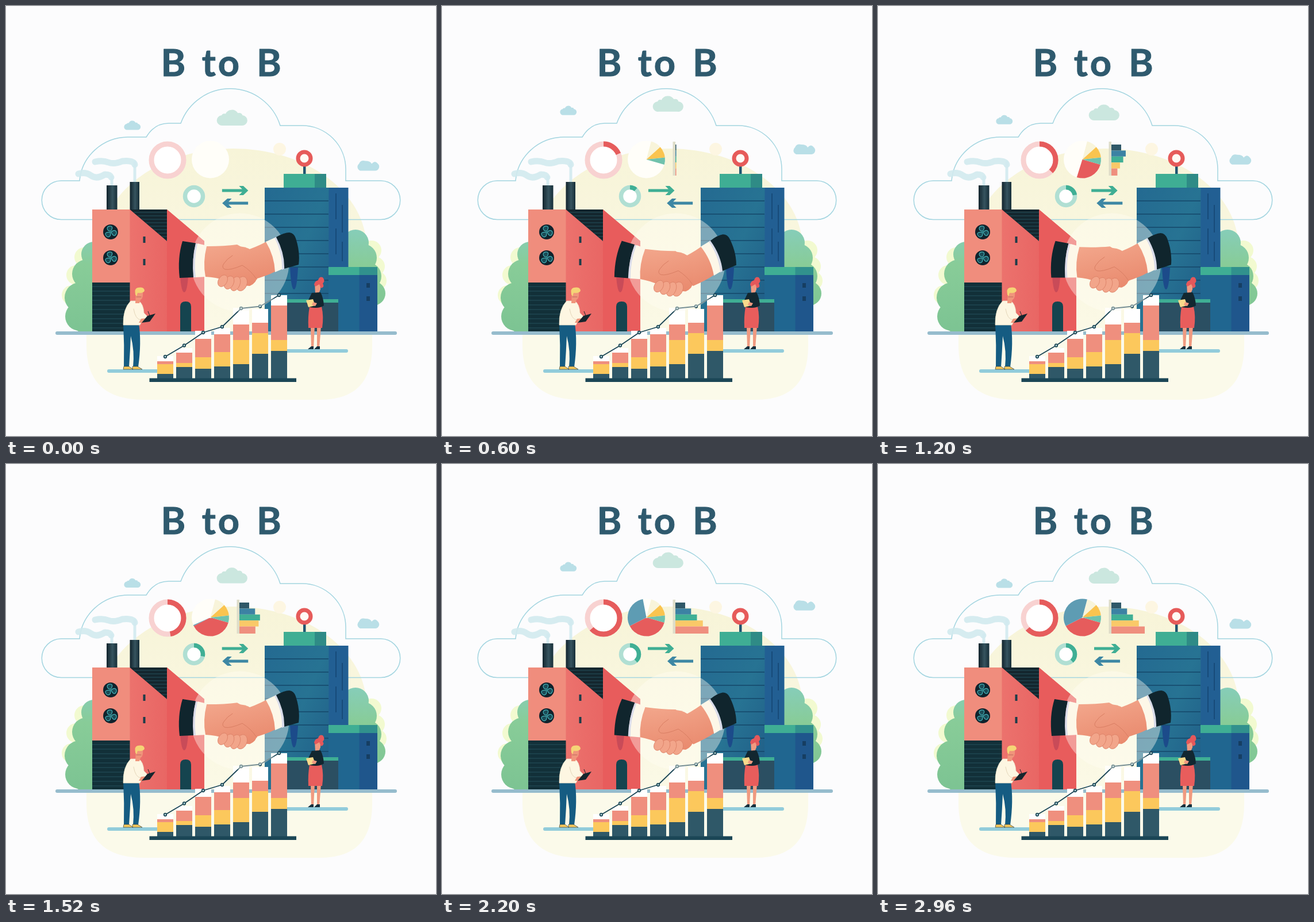
An HTML page for the animation above (3 s loop, 748 by 748 pixels).

```html
<!DOCTYPE html>
<html lang="en">
<head>
<meta charset="utf-8">
<title>B to B</title>
<style>
html, body { margin: 0; width: 100%; height: 100%; overflow: hidden; background: #fcfcfd; }
svg { display: block; width: 100vw; height: 100vh; }
text { font: 700 65px Lato, "Open Sans", sans-serif; fill: #2f5a6e; stroke: #2f5a6e; stroke-linejoin: round; text-anchor: middle; }
.line { fill: none; stroke-linecap: round; stroke-linejoin: round; }
</style>
</head>
<body>
<svg viewBox="0 0 748 748">
<defs>
  <linearGradient id="glow" x2="0" y2="1"><stop stop-color="#f7f4d8"/><stop offset="1" stop-color="#fbf9e6"/></linearGradient>
  <linearGradient id="wall"><stop stop-color="#ec726d"/><stop offset="1" stop-color="#e55a5b"/></linearGradient>
  <linearGradient id="glass" x2="1" y2="1"><stop stop-color="#246a91"/><stop offset=".5" stop-color="#277393"/><stop offset="1" stop-color="#1f5b86"/></linearGradient>
  <linearGradient id="pipe"><stop stop-color="#12242d"/><stop offset=".55" stop-color="#36545f"/><stop offset="1" stop-color="#172e38"/></linearGradient>
  <linearGradient id="skin" gradientUnits="userSpaceOnUse" x1="385" y1="412" x2="405" y2="492"><stop stop-color="#f2a58a"/><stop offset="1" stop-color="#e98a6e"/></linearGradient>
  <linearGradient id="leaf" gradientUnits="userSpaceOnUse" x1="0" y1="390" x2="0" y2="560"><stop stop-color="#86cdb8"/><stop offset=".35" stop-color="#88cc98"/><stop offset="1" stop-color="#7dc493"/></linearGradient>
  <path id="puff" d="M8 14A7 7 0 0 1 7 0Q8 -3 12 -2A9 9 0 0 1 28 -3Q33 -4 34 0A7 7 0 0 1 33 14Z"/>
  <path id="blade" fill="#1b4c57" stroke="#44b4ba" stroke-width="1.200" d="M0 -1C-9 -3 -7 -11 1 -10Q5 -8 0 -1Z"/>
  <g id="fan"><circle r="13" fill="#10232d"/><use href="#blade"/><use href="#blade" transform="rotate(120)"/><use href="#blade" transform="rotate(240)"/></g>
</defs>

<text x="291" y="122">B</text>
<text x="375.500" y="122" letter-spacing="4">to</text>
<text x="457.500" y="122">B</text>

<path fill="#fbfaea" d="M140 560H637V590C637 640 620 685 545 685H240C160 685 140 640 140 590Z"/>
<path fill="url(#glow)" d="M163 420A232 172 0 0 1 627 420V566H163Z"/>
<circle cx="476" cy="249" r="11" fill="#fdf6e2"/>
<path fill="none" stroke="#a3d5e0" stroke-width="1.500" d="M96 371.500A33.500 33.500 0 0 1 96 304H128A85 83 0 0 1 212 228H244Q258 204 283 204H304A91.300 91.300 0 0 1 477 208H515A76 76 0 0 1 591 284V304H652A33.500 33.500 0 0 1 652 371.500Z"/>

<g id="clouds">
  <use href="#puff" fill="#b9dfe7" transform="translate(205 205.500) scale(.72 .75)"/>
  <use href="#puff" fill="#cbe7df" transform="translate(366 190.500) scale(1.330 1.280)"/>
  <path fill="#b9dfe7" d="M616 287A7 7 0 0 1 614 275Q617 268 625 270Q634 270 636 275Q642 268 647 275A7 7 0 0 1 643 287Z"/>
</g>

<g class="line" stroke="#d2eaef" stroke-opacity=".9">
  <path stroke-width="11" d="M155 271Q168 268 178 272T202 270Q222 268 224 276"/>
  <path stroke-width="5" d="M224 272V306"/>
  <path stroke-width="11" d="M126 292Q138 288 148 295T172 293Q181 293 183 298"/>
  <path stroke-width="5" d="M184 297V312"/>
</g>

<g id="bushes"></g>
<path fill="url(#leaf)" d="M126 566Q108 555 108 535L140 440H152V566ZM594 400H625L645 500V540H594Z"/>

<path fill="url(#pipe)" d="M175 312H193.500V355H175Z"/>
<path fill="url(#pipe)" d="M215.500 306H232V355H215.500Z"/>
<path fill="#f08d7d" d="M150 354H216V482H150Z"/>
<path fill="#123039" d="M150 481H216V566H150Z"/>
<path fill="url(#wall)" d="M215.500 354H280L345 409V566H215.500Z"/>
<path fill="#e85c5c" d="M280 354L345 409V566H280Z"/>
<path fill="#14262e" d="M215.500 354H280V409Z"/>
<g id="slats" stroke="#24505c"></g>
<use href="#fan" x="182" y="393"/><use href="#fan" x="182" y="438"/>
<path fill="#1d3d49" d="M238.500 401H242.500V412H238.500ZM238.500 440H242.500V451H238.500Z"/>
<path fill="#15444f" d="M303 566V523Q303 514 312.500 514T322 523V566Z"/>
<path fill="#c94b58" d="M303 470H317Q315 498 310 498T303 470Z"/>

<path fill="#3fae94" d="M483 292H538V317H483Z"/><path fill="#2f8b86" d="M537 292H557V317H537Z"/>
<path fill="#1f5672" d="M517 278H521.500V292H517Z"/>
<circle cx="519" cy="265" r="11" fill="#fffaf4" stroke="#e65b5a" stroke-width="7"/>
<path fill="url(#glass)" d="M450 316H562V566H450Z"/>
<path fill="#225f93" d="M561.500 316H595.500V566H561.500Z"/>
<path id="floors" stroke="#14476a" stroke-width="1.500"/>
<path stroke="#174b79" stroke-width="2" d="M574 326V371M585 346V394M574 387V432M585 410V444"/>
<path fill="#206690" d="M561 467H615V566H561Z"/><path fill="#1f568c" d="M614.500 467H646V566H614.500Z"/>
<path fill="#3fae94" d="M561 454H615V468H561Z"/><path fill="#31918d" d="M614.500 454H646V468H614.500Z"/>
<path fill="#163e62" d="M627 482H633V490H627ZM627 505H633V513H627Z"/>
<path fill="#3fae94" d="M484 510H578V517H484Z"/><path fill="#2b4f62" d="M484 516H578V566H484Z"/>
<path stroke="#1e3d4d" d="M531 517V566"/>
<path fill="#1c4b8a" d="M494 455H508Q506 493 501 493T494 455Z"/>

<path stroke="#96bccd" stroke-width="6" stroke-linecap="round" d="M89 569H677"/>
<path stroke="#92ccdb" stroke-width="6" stroke-linecap="round" d="M179 635H270M480 600H592"/>

<g id="columns"></g>
<path fill="#1b4656" d="M249.500 647.500H505V654H249.500Z"/>
<path class="line" id="trend" stroke="#1b4656" stroke-width="1.800"/>
<g id="dots" fill="#b9d9dc" stroke="#1b4656" stroke-width="1.700"></g>

<circle cx="407" cy="446" r="85.500" fill="#fffdf3" opacity=".4"/>

<g id="left">
  <path fill="#10252d" d="M307 409L330 412.500Q323 440 326.500 472L302 473Q298 438 307 409Z"/>
  <path fill="#d9dcea" d="M330 413L334 414Q328 444 331 472H326Q323 440 330 413Z"/>
  <path fill="#fdf7e8" d="M333 413L350 417Q343 445 348 471L330 472Q326 444 333 413Z"/>
  <path fill="url(#skin)" d="M349 418Q380 418 402 415L422 426L410 470L380 477Q366 472 347 471Q342 446 349 418Z"/>
</g>
<g id="right">
  <path fill="url(#skin)" d="M453 410Q434 420 412 427L405 455L430 476Q455 469 468 462Q468 430 453 410Z"/>
  <path fill="#fdf7e8" d="M452 410L470 402Q485 430 484 456L468 463Q467 435 452 410Z"/>
  <path fill="#d9dcea" d="M467 403L471 402Q486 430 485 457L480 459Q481 430 467 403Z"/>
  <path fill="#10252d" d="M470 402Q484 394 493 394Q501 395 504 404Q512 428 509 450L484 457Q485 430 470 402Z"/>
</g>
<g id="clasp">
  <path fill="url(#skin)" d="M375 470L398 418Q415 417 426 424L437 434V470Q436 482 424 487L385 484Z"/>
  <g fill="#f2a58a" stroke="#dc8067" stroke-width=".8">
    <ellipse cx="410" cy="483" rx="9" ry="13" transform="rotate(22 410 483)"/>
    <ellipse cx="399" cy="483" rx="8" ry="13" transform="rotate(22 399 483)"/>
    <ellipse cx="388" cy="481" rx="8" ry="12" transform="rotate(25 388 481)"/>
    <ellipse cx="377" cy="478" rx="7.500" ry="11" transform="rotate(30 377 478)"/>
  </g>
  <path fill="url(#skin)" d="M437 424Q408 428 394 434Q384 440 379 448Q374 455 381 458Q390 460 411 451Q425 462 437 476Z"/>
  <path class="line" stroke="#d97e63" d="M394 434Q384 440 379 448Q374 455 381 458Q390 460 411 451Q427 461 435 474"/>
</g>

<g>
  <path fill="#155c82" d="M204 552H231Q236 585 230 628H221Q224 600 217 574Q216 600 214 628H205Q206 590 204 552Z"/>
  <path fill="#f5c85c" stroke="#30424a" stroke-width=".7" d="M205 627H214L221 632H204ZM220 627H229L237 632H220Z"/>
  <path fill="#fdf6e2" stroke="#eadfc6" stroke-width=".7" d="M217 513H231Q239 518 240 534L248 542L236 549L233 555H204Q203 527 217 513Z"/>
  <path class="line" stroke="#e4d6ba" d="M222 527Q225 545 234 546"/>
  <path fill="#f0957b" d="M226 497H238Q239 509 234 511L232 517H225ZM235 544L246 543L240 551H231Z"/>
  <path fill="#f5d476" d="M225 502Q223 491 229 490Q240 488 241 495Q240 500 229 499L227 505Z"/>
  <path class="line" stroke="#bb665c" d="M227 506H235"/>
  <path fill="#15262e" d="M236 551L246 539L260 535L250 549Z"/><path stroke="#15262e" d="M247 531L251 541"/>
</g>

<g>
  <path fill="#f09a80" d="M530 557H537L535 595H531ZM541 557H548L545 595H541Z"/>
  <path fill="#16303d" d="M531 592H535V597H525ZM541 592H546V597H536Z"/>
  <path fill="#e85d5c" d="M528 523H549Q553 540 550 560H526Q525 540 528 523Z"/>
  <path fill="#f09a80" d="M537 483H547V493L544 500H538Z"/>
  <path fill="#e4585b" d="M536 485Q537 478 543 477Q545 470 551 472Q556 478 551 483Q555 488 548 491L545 484L538 488Z"/>
  <path fill="#122730" d="M532 499L547 498Q552 506 553 521Q545 527 529 524L523 518Z"/>
  <path fill="#f8d98b" d="M522 512L534 510L538 521L526 524Z"/>
  <path fill="#f09a80" d="M534 515L541 517L538 522L532 520Z"/>
</g>

<g fill="none">
  <circle cx="281" cy="268" r="28" fill="#fff" stroke="#f8d2d1" stroke-width="9"/>
  <circle cx="327" cy="331" r="15.500" fill="#fff" stroke="#b0dfd3" stroke-width="7.500"/>
  <circle cx="355.500" cy="267" r="32.500" fill="#fffef9"/>
  <g id="arcs"></g>
</g>
<path id="axis" fill="#deddc9"/>
<g id="bars"></g>
<path id="go" fill="#3fae94" d="M376 318.500H411L405.500 313H413L421.500 321L413 329H405.500L411 323.500H376Z"/>
<path id="back" fill="#3d87a4" d="M421 340.500H387L392.500 335H385L376 343L385 351H392.500L387 345.500H421Z"/>
</svg>
<script>
const $ = id => document.getElementById(id);
const clamp = (v, lo, hi) => Math.min(hi, Math.max(lo, v));
const smooth = u => (u = clamp(u, 0, 1), u * u * (3 - 2 * u));

function add(parent, tag, attrs) {
  const el = document.createElementNS("http://www.w3.org/2000/svg", tag);
  for (const k in attrs) el.setAttribute(k, attrs[k]);
  return $(parent).appendChild(el);
}
const rect = (parent, x, y, width, height, fill) => add(parent, "rect", { x, y, width, height, fill });

// Bushes: pale rim first, then leaves
const bush = (fill, list) => list.forEach(([cx, cy, r]) => add("bushes", "circle", { cx, cy, r, fill }));
bush("#f2fad0", [[136, 437, 17], [122, 468, 17], [114, 503, 17], [636, 425, 17], [642, 453, 17], [645, 478, 17]]);
bush("url(#leaf)", [[153, 432, 22], [140, 466, 25], [128, 507, 26], [128, 540, 25],
  [608, 412, 23], [621, 438, 24], [629, 470, 24], [639, 500, 21]]);

// Building details
for (let y = 488; y < 566; y += 8) add("slats", "path", { d: `M150 ${y}H215` });
for (let y = 359; y < 409; y += 6) add("slats", "path", { d: `M${216 + (y - 354) * 1.17} ${y}H280` });
let floors = "";
for (let y = 339; y < 505; y += 23) floors += `M450 ${y}H561`;
$("floors").setAttribute("d", floors);

// Stacked columns: tops of the white, salmon, yellow and dark parts
const fills = ["#fff", "#ef8f7e", "#fcc85c", "#2f5868"];
[[609, 618, 623, 640], [595, 603, 621, 628], [565, 579, 611, 631], [560, 571, 602, 627],
 [525, 554, 581, 623], [527, 551, 569, 605], [503, 521, 581, 600]].forEach((tops, i) =>
  tops.forEach((y, j) => rect("columns", 263 + 33 * i, y, 28, 648 - y, fills[j])));
const trendY = [610, 590.500, 568, 558, 526, 522.500, 503];
const points = trendY.map((y, i) => [277 + 33 * i, y]);
$("trend").setAttribute("d", "M" + points.join("L"));
points.forEach(([cx, cy]) => add("dots", "circle", { cx, cy, r: 2.300 }));

// Arcs: centre, radius, line width, colour, first angle, length, delay in degrees, degrees per ms
const arcs = [
  [281, 268, 28, 9, "#e65c5c", 0, 228, 0, .112],
  [327, 331, 15.500, 7.500, "#40af95", 0, 139, 0, .068],
  ...[["#f8f4da", 15, 33], ["#fac44f", 48, 36], ["#70c2ad", 84, 22], ["#e65c5c", 106, 137], ["#5e9cb3", 243, 132]]
    .map(([fill, from, len]) => [355.500, 267, 16.250, 32.500, fill, from, len, from - 15, .152])
].map(([cx, cy, r, w, stroke, from, len, delay, speed]) => ({
  len, delay, speed,
  el: add("arcs", "circle", {
    cx, cy, r, stroke, "stroke-width": w, pathLength: 360,
    transform: `rotate(${from - 90} ${cx} ${cy})`
  })
}));

const bars = ["#2f5868", "#3c82a3", "#40af95", "#fac968", "#ef8f7e"]
  .map((fill, i) => rect("bars", 406, 241 + 10.400 * i, 0, i < 4 ? 10.400 : 12.400, fill));

const clouds = [...$("clouds").children].map((el, i) => [el, el.getAttribute("transform") || "", [30, 28, 33][i]]);
const move = (id, value) => $(id).setAttribute("transform", value);
const wave = t => (1 - Math.cos(t / 750 * Math.PI)) / 2;
const zigzag = t => 1 - Math.abs(1 - t / 750 % 2);

function draw() {
  const t = Math.floor(performance.now() % 3000 / 40) * 40;
  const swing = wave(t + 40);
  move("go", `translate(${-18 * swing})`);
  move("back", `translate(${16 * swing})`);
  move("left", `rotate(${7.5 * swing} 313 455)`);
  move("right", `translate(${-swing} ${3 * swing}) rotate(${-8 * swing} 495 420)`);
  move("clasp", `translate(0 ${10 * swing})`);

  const lift = (wave(t + 20) + zigzag(t + 20)) / 2;
  for (const [el, base, height] of clouds)
    el.setAttribute("transform", `translate(0 ${-height * lift}) ${base}`);

  for (const a of arcs)
    a.el.setAttribute("stroke-dasharray", `${clamp(t * a.speed - a.delay, 0, a.len)} 720`);

  const rise = 59 * smooth((t - 300) / 260);
  $("axis").setAttribute("d", `M401.500 295V${295 - rise}H406V295Z`);
  bars.forEach((bar, i) => {
    const start = 600 + 50 * i, end = 1000 + 320 * i;
    const full = 17 + 10.250 * i;
    bar.setAttribute("width", t < 560 ? 0 : Math.max(1.500, full * smooth((t - start) / (end - start))));
  });
  requestAnimationFrame(draw);
}
draw();
</script>
</body>
</html>
```
